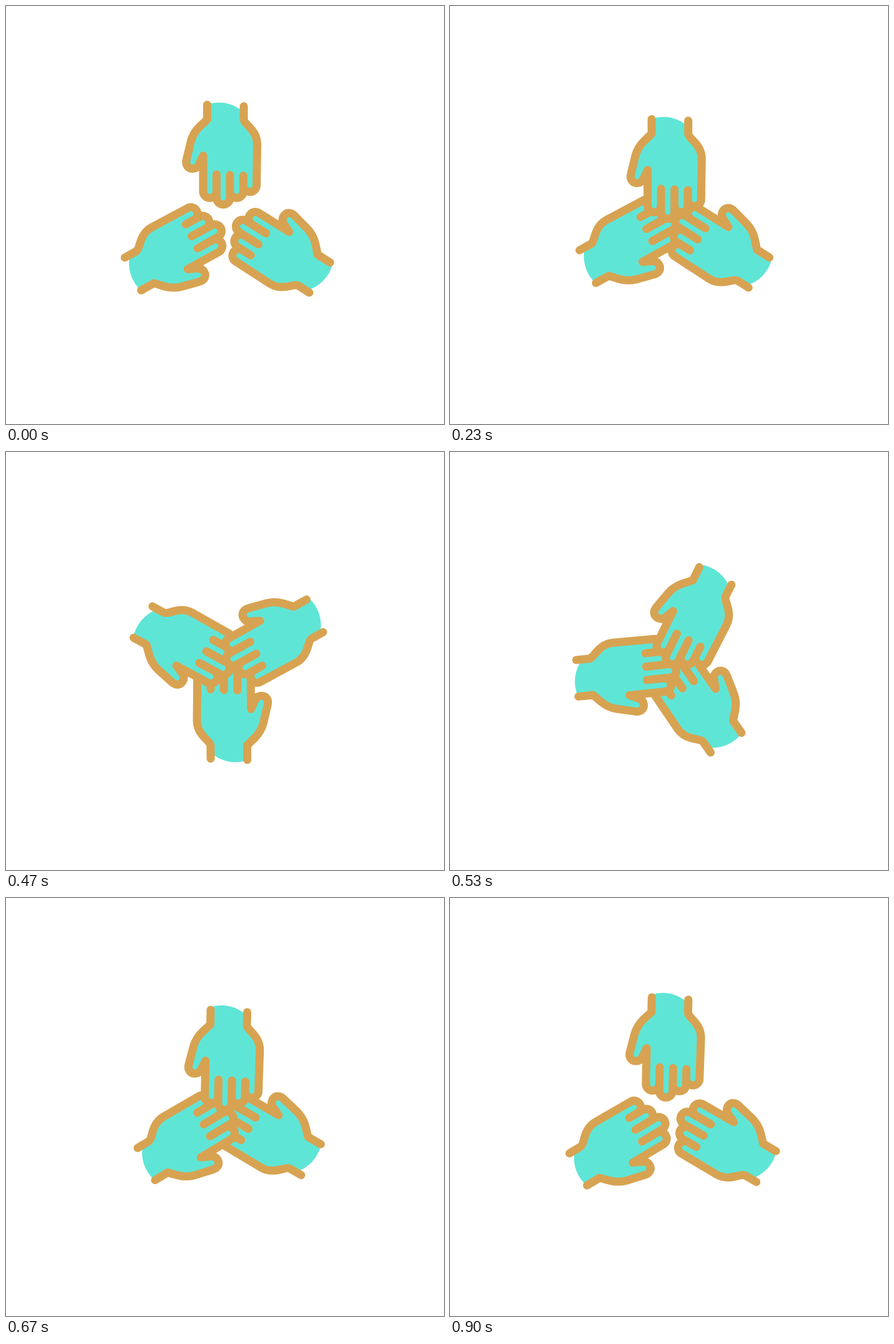
An HTML page with a canvas that plays this animation: 700 by 669 pixels, repeating every 1160 ms.

```html
<!DOCTYPE html>
<html>
<head>
<meta charset="utf-8">
<title>Joined hands</title>
<style>
html, body { margin: 0; width: 100%; height: 100%; overflow: hidden; background: #fff; }
canvas { display: block; }
</style>
</head>
<body>
<canvas id="stage" width="700" height="669"></canvas>
<script>
const ctx = document.getElementById('stage').getContext('2d');
const LOOP = 1160, STEP = 100 / 3, LAST = 27;
const TURN = -121, CENTER = [356, 342], WRIST = [321.5, 158.5];

// One hand, fingers down: wrist, thumb, four fingers, wrist
const tip = (x, y) => `V${y}A10.75 10.75 0 0 0 ${x} ${y}`;
const outline = 'M321.5 158.5V182L309 194Q299 204 295.5 217L288.5 246'
  + 'C286 255 291 261 298 261Q305.5 261 308.5 254L315 240'
  + tip(336.5, 297) + 'V270' + tip(358, 307.5) + 'V271'
  + tip(379.3, 298.5) + 'V272' + tip(400.5, 289)
  + 'L401.5 222C401.5 208 394 199 386 191Q380 185 380 182V161';
const line = new Path2D(outline);
const skin = cuff => new Path2D(`${outline}V${cuff + 13}A58 58 0 0 0 321.5 ${cuff}Z`);

// Wrist position when joined, offset at the start, offset at the end; back to front
const hands = [
  { angle: -119, at: [-118.3, 98.2], from: [-21.7, 14.8], to: [-20.7, 10.8], fill: skin(158) },
  { angle: 0, at: [-33.5, -155], from: [-1, -29], to: [2.9, -23.2], fill: skin(158) },
  { angle: 122.2, at: [152.5, 58.5], from: [9.5, 10], to: [21.6, 7], fill: skin(154) }
];

function ease(t, start, end) {
  const u = Math.min(1, Math.max(0, (t - start) / (end - start)));
  return u * u * (3 - 2 * u);
}

const rotate = deg => ctx.rotate(deg * Math.PI / 180);

function draw(t) {
  const apart = 1 - ease(t, 0, 330);
  const leave = ease(t, 610, 900);
  const spin = TURN * ease(t, 300, 630);
  ctx.fillStyle = '#fff';
  ctx.fillRect(0, 0, 700, 669);
  ctx.fillStyle = '#5fe5d6';
  ctx.strokeStyle = '#d7a352';
  ctx.lineWidth = 13;
  ctx.lineCap = ctx.lineJoin = 'round';
  for (const { angle, at, from, to, fill } of hands) {
    const [x, y] = at.map((v, i) => v + from[i] * apart + to[i] * leave);
    ctx.save();
    ctx.translate(...CENTER);
    rotate(spin);
    ctx.translate(x, y);
    rotate(angle);
    ctx.translate(-WRIST[0], -WRIST[1]);
    ctx.fill(fill);
    ctx.stroke(line);
    ctx.restore();
  }
}

function tick() {
  const t = performance.now() % LOOP;
  draw(Math.min(LAST, Math.floor((t + 3.4) / STEP)) * STEP);
  requestAnimationFrame(tick);
}
tick();
</script>
</body>
</html>
```
